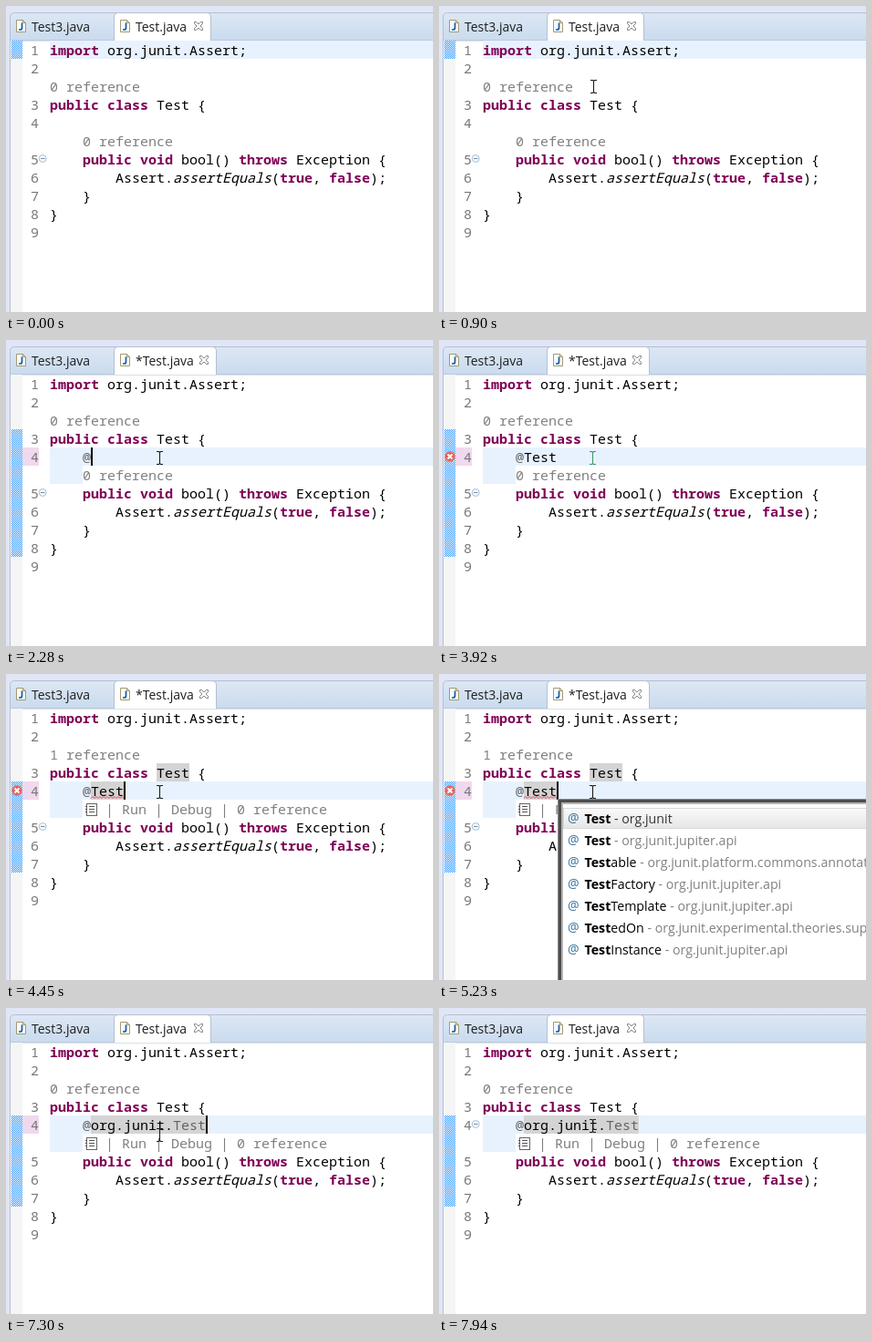
Animation, 468 px wide and 336 px high, one loop 8 s. Source, as an HTML page:

```html
<!DOCTYPE html>
<html lang="en">
<head>
<meta charset="utf-8">
<title>Java editor</title>
<style>
html, body { margin: 0; width: 100%; height: 100%; overflow: hidden; background: #fff; }
svg { display: block; width: 468px; height: 336px; }
text { white-space: pre; }
.code { font: 15px "Noto Sans Mono", "DejaVu Sans Mono", monospace; }
.kw { font-weight: 700; fill: #7f0055; }
.it { font-style: italic; }
.num { fill: #787878; }
.lens { fill: #808080; }
.anno { fill: #646464; }
.ui { font: 14px "Open Sans", "Noto Sans", sans-serif; }
.list { font-size: 14.2px; }
</style>
</head>
<body>
<svg id="stage" viewBox="0 0 468 336">
  <defs>
    <pattern id="hatch" width="2" height="2" patternUnits="userSpaceOnUse" shape-rendering="crispEdges">
      <rect width="2" height="2" fill="#3399ff"/>
      <path d="M0 0h1v1h-1zM1 1h1v1h-1z" fill="#f8fbff"/>
    </pattern>
    <linearGradient id="strip" x2="0" y2="1">
      <stop stop-color="#dde7f4"/><stop offset="1" stop-color="#c9dbee"/>
    </linearGradient>
    <linearGradient id="pick" x2="0" y2="1">
      <stop stop-color="#fafafa"/><stop offset="1" stop-color="#e6e6e6"/>
    </linearGradient>
  </defs>
  <g id="view"></g>
</svg>
<script>
const LOOP = 8000, COL = 9, LEFT = 48;
const view = document.getElementById("view");

// Top edge of each row; code lens rows sit between numbered lines.
const ROW = { 1: 38, 2: 58, lensA: 78, 3: 98, 4: 118, lensB: 138, 5: 158, 6: 178, 7: 198, 8: 218, 9: 238 };

const rect = (x, y, w, h, fill, more = "") =>
  `<rect x="${x}" y="${y}" width="${w}" height="${h}" fill="${fill}" ${more}/>`;
const path = (d, stroke, width = 1, fill = "none") =>
  `<path d="${d}" stroke="${stroke}" stroke-width="${width}" fill="${fill}"/>`;
const label = (x, y, str, cls, fill = "#000") =>
  `<text x="${x}" y="${y}" class="${cls}" fill="${fill}">${str}</text>`;
const codeAt = (x, row, str, cls = "") => label(x, ROW[row] + 16, str, "code " + cls);

// Each part is "class:text"; parts follow one another on the character grid.
function line(row, col, ...parts) {
  return parts.map(part => {
    const cut = part.indexOf(":"), str = part.slice(cut + 1);
    const out = codeAt(LEFT + col * COL, row, str, part.slice(0, cut));
    col += str.length;
    return out;
  }).join("");
}

const within = (t, ...spans) => spans.some(([a, b]) => t >= a && t < b);

// Last key whose time has come.
const stepAt = (t, keys) => keys.reduce((v, k) => (t >= k[0] ? k : v), keys[0]);

const typed = t => stepAt(t, [
  [0, ""], [2280, "@"], [2670, "@T"], [2820, "@Te"], [3060, "@Tes"],
  [3140, "@Test"], [5690, "@org.junit.Test"]
])[1];

const pointerKeys = [
  [280, 241, 208], [360, 192, 99], [510, 184, 64], [590, 176, 30], [660, 172, 17],
  [740, 171, 18], [820, 170, 48], [900, 169, 88], [970, 168, 116], [1050, 168, 129],
  [5070, 185, 139], [5150, 168, 129], [7300, 168, 139], [7410, 168, 129]
];

function pointer(t) {
  if (t < 280 || within(t, [2670, 3920])) return "";
  const [, x, y] = stepAt(t, pointerKeys);
  if (y < 38)
    return path(`M${x} ${y}v16l4-4 3 7 3-1-3-7h5z`, "#000", 1, "#fff");
  const color = within(t, [3920, 4450]) ? "#3c9a68" : "#1c1c1c";
  return path(`M${x - 3} ${y - 6.5}h2.5l1 1 1-1h2.5M${x + .5} ${y - 6}v13M${x - 3} ${y + 7.5}h2.5l1-1 1 1h2.5`, color, 1.1);
}

function fileIcon(x) {
  return path(`M${x + .5} 15.5h7l3 3v10h-10z`, "#a39a6c", 1, "#f6f9ff") +
    path(`M${x + 7.5} 15.5v3h3`, "#a39a6c") +
    path(`M${x + 6.5} 18.5v5.5q0 2-2 2h-1.5`, "#1c5a9c", 1.7);
}

function tabs(dirty) {
  const end = dirty ? 230.5 : 224.5, x = end - 13;
  return rect(0, 0, 468, 38, "#e1e6f6") + rect(0, 38, 4, 298, "#e1e6f6") +
    path("M4.5 38V12q0-4.5 5-4.5H470V38z", "#b4bfd2", 1, "url(#strip)") +
    path("M4.5 38V336", "#b4bfd2") + rect(5, 37, 463, 1, "#bccadd") +
    path(`M118.5 38V12q0-4.5 5-4.5H${end - 5}q5 0 5 4.5V38`, "#b4bfd2", 1, "#fff") +
    fileIcon(11) + label(28, 28, "Test3.java", "ui", "#1e1e1e") +
    fileIcon(125) + label(142, 28, (dirty ? "*" : "") + "Test.java", "ui", "#1e1e1e") +
    path(`M${x - 5} 17.5h2l2.5 2.5 2.5-2.5h2v2l-2.5 2.5 2.5 2.5v2h-2l-2.5-2.5-2.5 2.5h-2v-2l2.5-2.5-2.5-2.5z`, "#858585", 1, "#fff");
}

const fold = row => {
  const y = ROW[row] + 9.5;
  return `<circle cx="40.2" cy="${y}" r="4" fill="#f4f8fc" stroke="#a9bfd4"/>` + path(`M38 ${y}h4.5`, "#6f8eac");
};

const errorMark = () =>
  `<circle cx="12" cy="128" r="5.5" fill="#e0645f" stroke="#d98a86"/>` +
  path("M9.5 125.5l5 5m0-5l-5 5", "#fff", 1.8);

function squiggle(from, to) {
  let d = `M${from} 136.5`;
  for (let x = from; x < to; x += 4) d += "l2-2 2 2";
  return path(d, "#f0405a");
}

function lensIcon() {
  return rect(88.5, 142.5, 11, 13, "#fff", 'stroke="#666"') +
    path("M91 145.5h6M91 148.5h6M91 151.5h6M87 145.5h2M87 148.5h2M87 151.5h2", "#555");
}

const proposals = [
  ["", "org.junit"], ["", "org.junit.jupiter.api"],
  ["able", "org.junit.platform.commons.annotation"],
  ["Factory", "org.junit.jupiter.api"], ["Template", "org.junit.jupiter.api"],
  ["edOn", "org.junit.experimental.theories.suppliers"],
  ["Instance", "org.junit.jupiter.api"]
];

function popup() {
  const frame = (inset, fill) => rect(130 + inset, 137 + inset, 340, 200, fill);
  return frame(0, "#8a8a8a") + frame(1, "#4d4d4d") + frame(4, "#b4b4b4") + frame(6, "#fff") +
    rect(136.5, 147.5, 340, 22, "url(#pick)", 'stroke="#d8d8d8"') +
    proposals.map(([rest, pkg], i) => {
      const y = 164 + i * 24;
      return `<text x="141" y="${y - 1}" class="ui" fill="#35709c" font-weight="700">@</text>` +
        `<text x="159.5" y="${y}" class="ui list"><tspan font-weight="700">Test</tspan>${rest}` +
        `<tspan fill="${i ? "#808080" : "#333"}"> - ${pkg}</tspan></text>`;
    }).join("");
}

function ruler(t) {
  const [, y, h] = stepAt(t, [[0, 38, 20], [1820, 98, 140], [4450, 118, 100]]);
  return rect(5, 38, 13, 298, "#f5f5f5") + rect(6, y, 12, h, "url(#hatch)");
}

function caret(t, len) {
  const on = within(t, [1130, 1670], [2200, 3600], [4450, 4690], [5230, 6310], [6530, 6760], [7300, 7940]);
  return on ? rect(84 + len * COL, 118, 2, 20, "#000") : "";
}

function annotation(t, text) {
  if (!text) return "";
  const solved = t >= 6380, end = 84 + text.length * COL;
  let out = t >= 4450 ? rect(93, 118, end - 93, 20, "#d4d4d4") : "";
  out += solved
    ? line(4, 4, "anno:@", ":org.junit.", "anno:Test")
    : line(4, 4, "anno:@", ":" + text.slice(1));
  return within(t, [4450, 6380]) ? out + squiggle(93, end) : out;
}

function draw(t) {
  const text = typed(t), active = t >= 1130 ? 4 : 1;
  const linked = within(t, [4450, 6380]), runnable = t >= 4450;
  let out = rect(0, 0, 468, 336, "#fff") + tabs(within(t, [2280, 7300])) + ruler(t);

  out += rect(LEFT, ROW[active], 420, 20, "#e8f2fe");
  if (text) out += rect(LEFT, 138, 36, 20, "#e8f2fe");
  if (within(t, [2280, 7940])) out += rect(18, 118, 18, 20, "#f0d9ee");
  if (within(t, [4450, 6450])) out += rect(165, 98, 36, 20, "#d4d4d4");
  for (let n = 1; n <= 9; n++) out += codeAt(27, n, n, "num");
  if (!within(t, [6530, 7940])) out += fold(t >= 7940 ? 4 : 5);
  if (within(t, [3920, 6380])) out += errorMark();

  out += line(1, 0, "kw:import", ": org.junit.Assert;") +
    line("lensA", 0, `lens:${linked ? 1 : 0} reference`) +
    line(3, 0, "kw:public", ": ", "kw:class", ": Test {") +
    annotation(t, text) +
    (runnable
      ? lensIcon() + codeAt(109, "lensB", "| Run | Debug | 0 reference", "lens")
      : line("lensB", 4, "lens:0 reference")) +
    line(5, 4, "kw:public", ": ", "kw:void", ": bool() ", "kw:throws", ": Exception {") +
    line(6, 8, ":Assert.", "it:assertEquals", ":(", "kw:true", ":, ", "kw:false", ":);") +
    line(7, 4, ":}") + line(8, 0, ":}");

  out += caret(t, text.length);
  if (within(t, [4550, 5690])) out += popup();
  return out + pointer(t);
}

let shown = "";
const start = performance.now();
function tick() {
  const next = draw((performance.now() - start) % LOOP);
  if (next !== shown) view.innerHTML = shown = next;
  requestAnimationFrame(tick);
}
tick();
</script>
</body>
</html>
```
